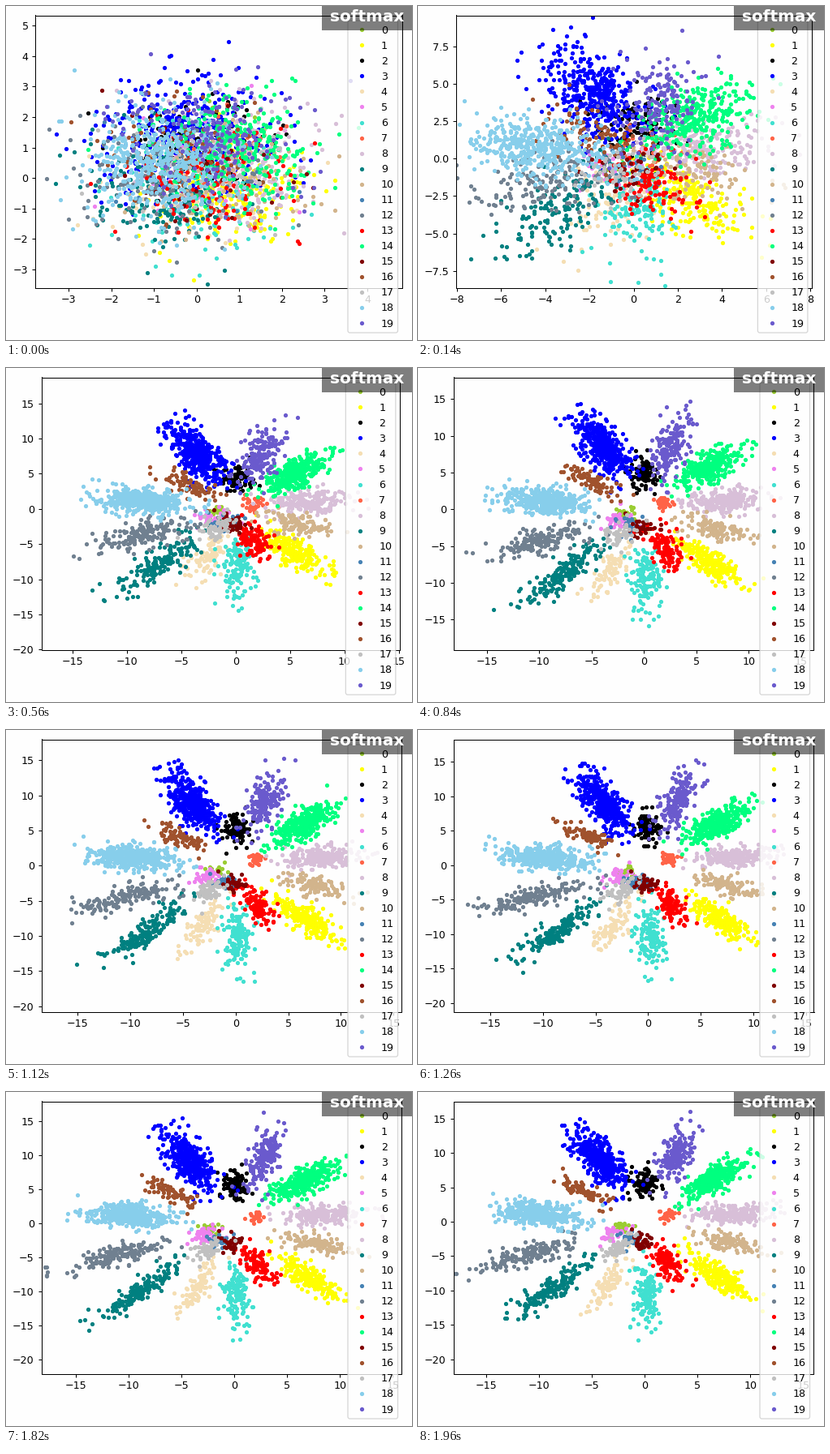
A matplotlib script for the animation above (2100 ms loop, 500x412 px).

```python
import numpy as np
import matplotlib.pyplot as plt
from matplotlib.animation import FuncAnimation
from matplotlib.patches import FancyBboxPatch, Rectangle

W, H = 500, 412
STEPS, INTERVAL = 15, 140
SCALE = 0.909                 # size of type, lines and dots against the defaults
FONT = 10 * SCALE
TOP, BOTTOM, RIGHT = 11.5, 347.5, 487.5
PAPER = "#fefefe"

# Colour, direction in degrees, final distance from the origin, number of dots
CLASSES = [
    ("yellowgreen", 201, 2.5, 18), ("yellow", -48, 10.7, 220),
    ("black", 90, 5.5, 100), ("blue", 115, 10.1, 430),
    ("wheat", 249, 10.1, 85), ("violet", 208, 3.4, 40),
    ("turquoise", 271, 10.8, 140), ("tomato", 24, 2.2, 30),
    ("thistle", 8, 8.8, 220), ("teal", 228, 13.4, 170),
    ("tan", -20, 8.6, 110), ("steelblue", 242, 3.0, 35),
    ("slategray", 203, 12.2, 160), ("red", -70, 6.6, 110),
    ("springgreen", 44, 9.1, 330), ("maroon", 266, 3.0, 35),
    ("sienna", 143, 7.6, 75), ("silver", 235, 4.9, 55),
    ("skyblue", 173, 9.9, 430), ("slateblue", 74, 10.4, 170)]

# Axis limits at a few steps
VIEW_STEPS = [0, 2, 4, 6, 8, 11, 14]
LIMITS = [
    [-3.78, -12.25, -17.9, -18.2, -18.45, -18.6, -18.1],
    [4.81, 11.3, 15.1, 16.2, 15.8, 15.6, 16.0],
    [-3.60, -13.65, -20.02, -19.1, -20.8, -22.2, -22.1],
    [5.34, 13.8, 18.7, 17.95, 18.0, 18.8, 17.5]]


def noise(rng, n):
    """Round scatter with a dense middle and a few far dots."""
    reach = np.exp(0.3 * rng.standard_normal((n, 1)))
    return rng.standard_normal((n, 2)) * reach


base_rng = np.random.default_rng(7)
BASE = [noise(base_rng, n) for *_, n in CLASSES]


def cloud(step, angle, radius, base, rng):
    """Dots of one class: a petal that moves out along its ray and narrows."""
    n = len(base)
    a = np.radians(angle)
    ray = np.array([np.cos(a), np.sin(a)])
    normal = np.array([-ray[1], ray[0]])

    # Large classes separate sooner
    growth = 1 - 0.9 * np.exp(-step / (3.6 - n / 300))
    centre = growth * radius * ray + np.array([0.15, 0.45]) * np.exp(-step / 2)

    length = 0.2 * radius + (0.85 - 0.2 * radius) * np.exp(-step)
    width = 0.28 + 0.023 * np.sqrt(n)
    width += (0.9 - width) * np.exp(-step / 6)

    z = np.clip(0.8 * base + 0.6 * noise(rng, n), -3, 3)
    return centre + z[:, :1] * length * ray + z[:, 1:] * width * normal


fig = plt.figure(figsize=(W / 100, H / 100), dpi=100, facecolor=PAPER)
ax = fig.add_axes([0.1, 0.15, 0.8, 0.8], facecolor=PAPER)
ax.tick_params(labelsize=FONT, length=3.5 * SCALE, width=0.8 * SCALE, pad=3.5 * SCALE)
for spine in ax.spines.values():
    spine.set_linewidth(0.8 * SCALE)

DOT = dict(marker=".", ls="none", ms=6.2 * SCALE, mew=SCALE)
dots = [ax.plot([], [], color=color, **DOT)[0] for color, *_ in CLASSES]

# Legend on its own pixel-sized layer
key = fig.add_axes([0, 0, 1, 1], zorder=5)
key.set_axis_off()
key.set_ylim(H, 0)
key.add_patch(FancyBboxPatch(
    (RIGHT - 66.5, 18), 61.5, 385, boxstyle="round,pad=0,rounding_size=2.5",
    fc="white", ec="0.8", lw=SCALE, alpha=0.8))
for i, (color, *_) in enumerate(CLASSES):
    y = 29.2 + 19.05 * i
    key.plot([RIGHT - 49.3], [y], color=color, **DOT)
    key.text(RIGHT - 25.7, y + 4.4, str(i), fontsize=FONT, va="baseline")

# Title badge
fig.add_artist(Rectangle((389 / W, 1 - 30 / H), 111 / W, 30 / H,
                         fc="black", ec="none", alpha=0.5, zorder=10))
fig.text(398.6 / W, 1 - 18.7 / H, "softmax", color="white", weight="bold",
         fontsize=14.4, va="baseline", zorder=11)


def place_axes(step):
    """Set the limits and leave room for the tick labels on both sides."""
    x0, x1, y0, y1 = (np.interp(step, VIEW_STEPS, row) for row in LIMITS)
    ax.set_xlim(x0, x1)
    ax.set_ylim(y0, y1)
    labels = [f"{t:g}" for t in ax.get_yticks() if y0 <= t <= y1]
    left = 22 + 7.2 * max(len(s) - 0.5 * ("." in s) for s in labels)

    last = max(t for t in ax.get_xticks() if t <= x1)
    overhang = 8 - (x1 - last) * (RIGHT - left) / (x1 - x0)
    right = RIGHT - 0.4 * max(0, overhang)
    ax.set_position([left / W, 1 - BOTTOM / H, (right - left) / W, (BOTTOM - TOP) / H])
    key.set_xlim(RIGHT - right, W + RIGHT - right)


def update(step):
    place_axes(step)
    rng = np.random.default_rng(100 + step)
    for line, base, (_, angle, radius, _) in zip(dots, BASE, CLASSES):
        line.set_data(*cloud(step, angle, radius, base, rng).T)
    return dots


anim = FuncAnimation(fig, update, frames=STEPS, interval=INTERVAL,
                     repeat=True, repeat_delay=0, blit=False)
plt.show()
```
